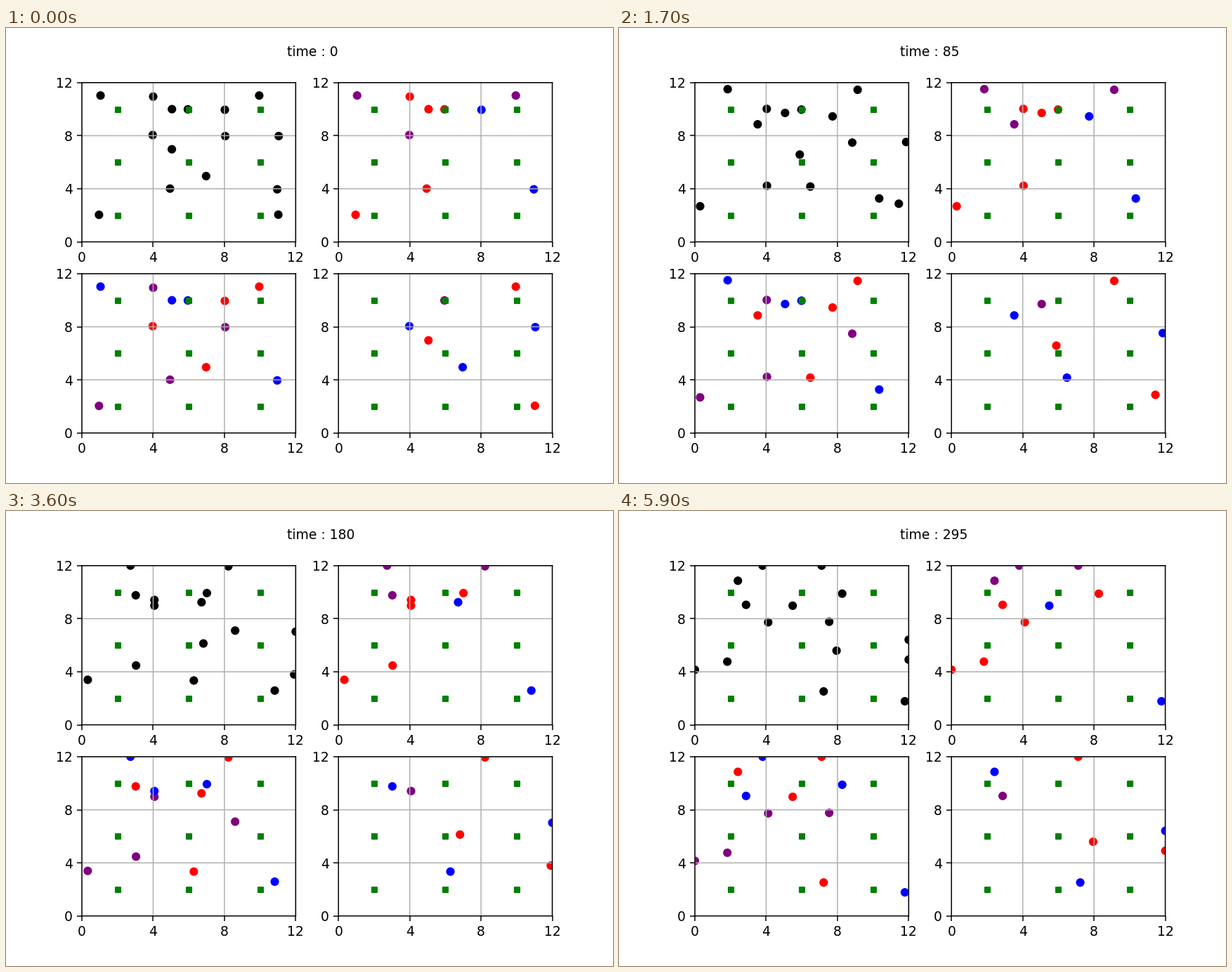
These frames come from a looping animation (864x648 px, 6000 ms). A matplotlib script:

```python
import numpy as np
import matplotlib.pyplot as plt
from matplotlib.animation import FuncAnimation

plt.rcParams["path.snap"] = False

FRAMES = 60
INTERVAL = 100
TICK = 5          # simulated time per frame
SIZE = 12         # side of the square world
SPEED = 0.0545    # distance walked per frame
COLORS = {"r": "red", "b": "blue", "p": "purple"}

# Agents walk straight from a grid point and may turn on the way:
# colours in panels 2 to 4 ("-" = absent), start, heading, {frame: new heading}
AGENTS = [
    ("pb-", 1, 11, 31, {}),
    ("rp-", 4, 11, -88, {}),
    ("rb-", 5, 10, -2, {}),
    ("rbp", 6, 10, 197, {}),
    ("br-", 8, 10, -65, {9: 192}),
    ("-p-", 8, 8, -32, {25: 212, 34: 148}),
    ("prb", 4, 8, 119, {}),
    ("--r", 5, 7, -25.5, {}),
    ("-rb", 7, 5, 238, {32: -41}),
    ("rp-", 5, 4, 166.5, {}),
    ("rp-", 1, 2, 136, {26: 44, 36: 143}),
    ("prr", 10, 11, 152, {}),
    ("--b", 11, 8, -29, {}),
    ("bb-", 11, 4, 228, {22: -40}),
    ("--r", 11, 2, 63, {}),
]


def walk(x, y, heading, turns):
    """Place in every frame, held inside the world."""
    angles = np.full(FRAMES, float(heading))
    for frame, turned in turns.items():
        angles[frame:] = turned
    angles = np.radians(angles)
    steps = SPEED * np.column_stack([np.cos(angles), np.sin(angles)])
    return np.clip([x, y] + np.cumsum(steps, axis=0), 0, SIZE)


def make_panel(ax, colors):
    dots = ax.scatter(np.zeros(len(colors)), np.zeros(len(colors)), s=30, c=colors)
    gx, gy = np.meshgrid([2, 6, 10], [2, 6, 10])
    ax.scatter(gx, gy, s=15, c="green", marker="s")
    ticks = range(0, SIZE + 1, 4)
    ax.set(xlim=(0, SIZE), ylim=(0, SIZE), xticks=ticks, yticks=ticks)
    ax.grid(True)
    return dots


paths = np.array([walk(*agent[1:]) for agent in AGENTS])
fig, axes = plt.subplots(2, 2, figsize=(6.4, 4.8), dpi=135)
panels = []
for i, ax in enumerate(axes.flat):
    if i == 0:
        members = list(range(len(AGENTS)))
        colors = ["black"] * len(members)
    else:
        members = [k for k, a in enumerate(AGENTS) if a[0][i - 1] != "-"]
        colors = [COLORS[AGENTS[k][0][i - 1]] for k in members]
    panels.append((make_panel(ax, colors), members))
clock = axes[0, 0].text(11.5, 14, "time : 0")


def update(frame):
    for dots, members in panels:
        dots.set_offsets(paths[members, frame])
    clock.set_text(f"time : {frame * TICK}")
    return [dots for dots, _ in panels] + [clock]


anim = FuncAnimation(fig, update, frames=FRAMES, interval=INTERVAL, repeat=True)
plt.show()
```
